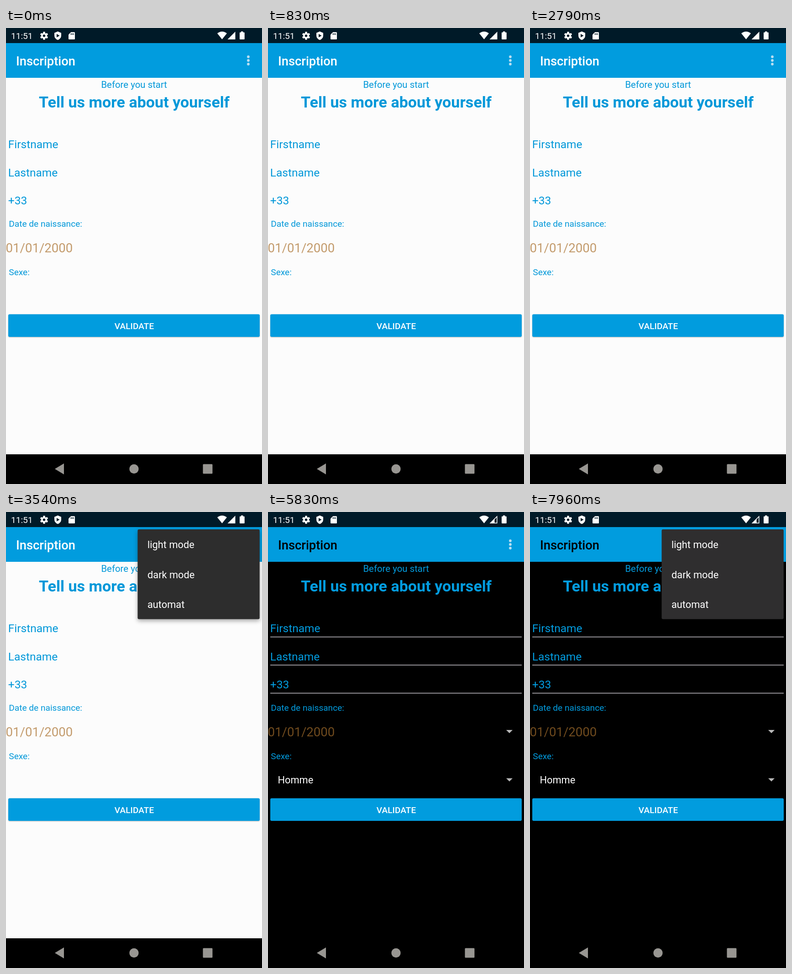
An HTML page that plays this animation: 561x998 px, repeating every 8 s.

```html
<!DOCTYPE html>
<html lang="en">
<head>
<meta charset="utf-8">
<title>Inscription</title>
<style>
  html, body { margin: 0; width: 100%; height: 100%; overflow: hidden; background: #000; }
  svg { display: block; width: 100%; height: 100%; font-family: Roboto, sans-serif;
        --paper: #fcfcfc; --blue: #0298d9; --title: #fff; --date: #c39b6c; --menu: #2d2d2d; }
  svg.dark { --paper: #000; --blue: #039cdf; --title: #000; --date: #704b1e; --menu: #2f2e2f; }
  .dark-only { display: none; }
  .dark .dark-only { display: inline; }
  .dark .shadow { filter: none; }
  .paper { fill: var(--paper); }
  .accent { fill: #019cde; }
  .blue { fill: var(--blue); }
  .white { fill: #fff; }
  .medium { font-weight: 500; }
  .small { font-size: 19.1px; }
  .item { font-size: 21.8px; }
  .field { font-size: 24.5px; }
  .middle { text-anchor: middle; }
  #button { filter: drop-shadow(0 1.5px 1px #0004); }
  #panel { fill: var(--menu); filter: drop-shadow(0 4px 5px #0005); }
  .dark #button, .dark #panel { filter: none; }
</style>
</head>
<body>
<svg id="stage" viewBox="0 0 561 998" preserveAspectRatio="none">
  <rect width="561" height="998"/>
  <rect class="paper" y="109" width="561" height="824"/>
  <rect class="accent" y="33" width="561" height="76"/>
  <rect width="561" height="33" fill="#001a28"/>

  <g class="white">
    <text class="small" x="11" y="24">11:51</text>
    <g transform="translate(83.5 17)">
      <circle r="4.6" fill="none" stroke="#fff" stroke-width="3.6"/>
      <g id="teeth"></g>
    </g>
    <path d="M113.5 7.5l7.5 3.3v5.4q0 7-7.5 10q-7.500-3-7.500-10v-5.400z"/>
    <path d="M111 13l6.500 3.800-6.500 3.800z" fill="#001a28"/>
    <path d="M142.500 9h7q1.500 0 1.500 1.500v13q0 1.500-1.500 1.500h-11q-1.500 0-1.500-1.500v-9z"/>
    <path d="M142.500 11.500v3.500M145.300 11.500v3.500M148 11.500v3.500" stroke="#001a28" stroke-width="1.400"/>
    <path d="M463 11.800q10.500-8 21 0l-10.500 13z"/>
    <path id="signalFull" d="M502.500 8v17h-17z"/>
    <path id="signalWeak" fill-rule="evenodd" d="M502.500 8v17h-17zM501 11.700l-4.500 4.500v7.300h4.500z"/>
    <path d="M515 7.500h4.500v2h2q1.300 0 1.300 1.300v13q0 1.200-1.300 1.200h-8.300q-1.200 0-1.200-1.200v-13q0-1.300 1.200-1.300h1.800z"/>
  </g>

  <text class="medium" x="22" y="81.500" font-size="27.3" style="fill:var(--title)">Inscription</text>
  <g fill="#b9dff2">
    <circle cx="531" cy="63" r="2.900"/><circle cx="531" cy="71" r="2.900"/><circle cx="531" cy="79" r="2.900"/>
  </g>

  <g class="blue">
    <text class="middle" x="280.700" y="131" font-size="20.4">Before you start</text>
    <text class="middle" x="281" y="173.500" font-size="34.1" font-weight="700">Tell us more about yourself</text>
    <text class="field" x="4.800" y="263">Firstname</text>
    <text class="field" x="4.800" y="324.500">Lastname</text>
    <text class="field" x="4.800" y="386">+33</text>
    <text class="small" x="6.300" y="435">Date de naissance:</text>
    <text class="small" x="6.300" y="541">Sexe:</text>
  </g>
  <text x="-0.500" y="490.500" font-size="27.6" style="fill:var(--date)">01/01/2000</text>

  <g class="dark-only">
    <path d="M5 273.500h551M5 335h551M5 396.500h551" stroke="#c3c0c6" stroke-width="1.400"/>
    <path d="M522 477h14l-7 7zM522 582.800h14l-7 7z" fill="#b9b9b9"/>
    <text class="item white" x="21.500" y="594.300">Homme</text>
  </g>

  <rect id="button" class="accent" x="5" y="626.500" width="551" height="49.500" rx="3"/>
  <text class="small medium white middle" x="281" y="658.500">VALIDATE</text>

  <g fill="#989692">
    <path d="M107 965l20-12v24z"/>
    <circle cx="280.500" cy="965" r="10.200"/>
    <rect x="431.500" y="954.500" width="21" height="21" rx="1.500"/>
  </g>

  <g id="menu">
    <rect id="panel" x="288.500" y="38" width="267.300" height="196.500" rx="3"/>
    <rect id="highlight" x="288.500" y="103.700" width="267.300" height="65.300" fill="#464644"/>
    <g class="item white">
      <text x="310" y="79">light mode</text>
      <text x="310" y="144.500">dark mode</text>
      <text x="310" y="210">automat</text>
    </g>
  </g>
</svg>
<script>
  const LOOP = 8000;
  const DARK_AT = 5220;
  const SIGNAL_DROP_AT = 4600;
  const el = id => document.getElementById(id);
  const ramp = (t, start, duration) => {
    const x = Math.min(1, Math.max(0, (t - start) / duration));
    return x * x * (3 - 2 * x);
  };

  el('teeth').innerHTML = Array.from({ length: 6 }, (_, i) =>
    `<rect x="-2.2" y="-8.8" width="4.4" height="4" rx=".8" transform="rotate(${i * 60})"/>`).join('');

  function render(t) {
    el('stage').classList.toggle('dark', t >= DARK_AT);
    el('signalFull').style.display = t < SIGNAL_DROP_AT ? '' : 'none';
    el('signalWeak').style.display = t < SIGNAL_DROP_AT ? 'none' : '';

    const opening = t < DARK_AT ? ramp(t, 3000, 180) : ramp(t, 7080, 180);
    const closing = t < DARK_AT ? ramp(t, 5070, 130) : 0;
    const scale = 0.75 + 0.25 * opening;
    el('menu').setAttribute('opacity', opening * (1 - closing));
    el('menu').setAttribute('transform', `translate(555.8 38) scale(${scale}) translate(-555.8 -38)`);
    el('highlight').setAttribute('opacity', t < DARK_AT ? ramp(t, 4250, 300) : 0);
  }

  function tick() {
    render(performance.now() % LOOP);
    requestAnimationFrame(tick);
  }
  tick();
</script>
</body>
</html>
```
